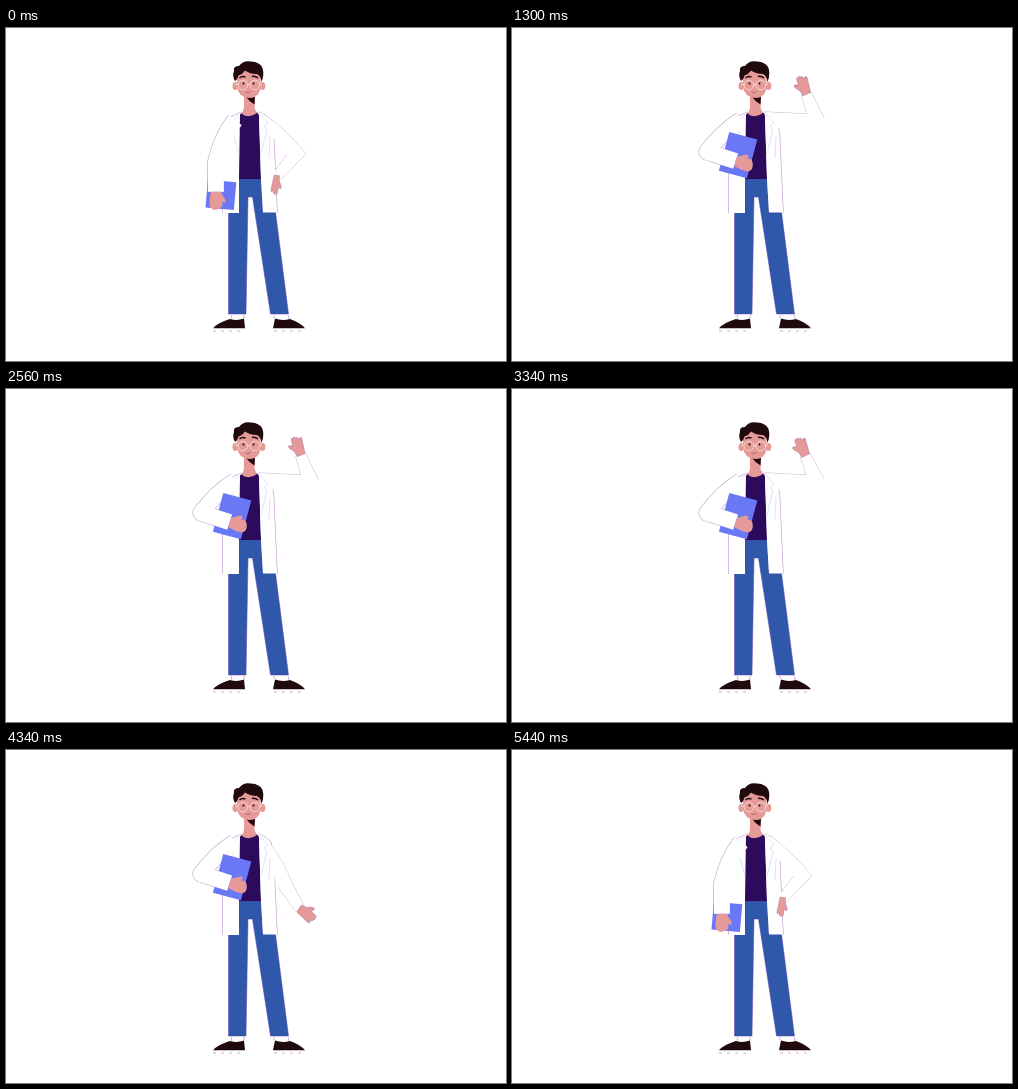
Recreate the animation shown at these times as an HTML page. Size 500x333 px, loop 6000 ms.

```html
<!DOCTYPE html>
<html lang="en">
<head>
<meta charset="utf-8">
<title>Waving doctor</title>
<style>
  html, body { margin: 0; width: 100%; height: 100%; overflow: hidden; background: #fff; }
  svg { display: block; width: 100%; height: 100%; }
  .edge { fill: none; stroke: #c39acb; stroke-width: .8; stroke-linejoin: round; }
  .fold { fill: none; stroke: #d9d9f6; stroke-width: .8; }
  .skin { fill: #e59a98; }
  .palm { stroke: #a873b0; stroke-width: .5; }
  .dark { fill: #210a0d; }
  .white { fill: #fff; }
  .sleeve { fill: none; stroke: #fff; stroke-width: 16; stroke-linejoin: round; }
</style>
</head>
<body>
<svg viewBox="0 0 500 333">
  <!-- legs and shoes -->
  <path fill="#3058aa" stroke="#5b3fae" stroke-width=".5" d="M233 151H255L257 184H269.500L282.500 286H264.500L246.500 169H242L240 286H222.500V184H233Z"/>
  <path class="edge" d="M225 287L226 291M282 287L283 291M238 287V290M268 287V290"/>
  <path class="edge" stroke-dasharray="3 5" d="M207 303H239M268 303H300"/>
  <path class="dark" d="M224 291Q231 293 238 290.500L239 300.300H207Q211 295 224 291ZM284 291Q276 293 269 290.500L267 300.300H299Q295 295 284 291Z"/>

  <!-- shirt, neck and head -->
  <path fill="#2c0a5c" d="M234 86L238 84L250 84L253 86L255 151H233Z"/>
  <path class="skin" d="M238 64L249 68L248.500 80L251 85Q243 91 236 86L238 80Z"/>
  <path class="dark" d="M239.500 68Q245 70.500 249 68.500L248.500 76.500Q243 73.500 239.500 68Z"/>
  <g class="skin">
    <ellipse cx="229.300" cy="58" rx="2.800" ry="4"/>
    <ellipse cx="256.500" cy="58" rx="2.800" ry="4"/>
    <path d="M231 42H254.500V58Q254 70 243 70Q232 69 231 58Z"/>
  </g>
  <path class="dark" d="M229 53Q226 48 228 43Q227 38 233 38Q237 32 245 33.500Q254 34 256.500 40Q258.500 47 255.500 54Q255 48 251 46Q244 46 239 42.500Q237 46 232.500 47.500Q231 52 229 53Z"/>
  <path d="M233.500 50Q236 47.500 239.500 49M246 48.500Q249 47.500 252 50" fill="none" stroke="#210a0d" stroke-width="1.400"/>
  <g fill="none" stroke="#f6dccf" stroke-width=".9">
    <circle cx="236.800" cy="57" r="4.800"/>
    <circle cx="248.800" cy="57" r="4.800"/>
    <path d="M241.600 56.500H244M229 56L232 56.500M253.600 56.500L256 56"/>
  </g>
  <g class="dark">
    <circle cx="237.500" cy="55.500" r="1"/>
    <circle cx="247.500" cy="55.500" r="1"/>
  </g>
  <path d="M239.500 64Q242 65.500 244.500 63.500" fill="none" stroke="#a0505c" stroke-width=".7"/>

  <!-- coat and waving arm -->
  <path id="armEdge" class="edge"/>
  <path id="sleeveEdge" class="edge" style="stroke-width:17.200"/>
  <path class="edge" style="stroke-width:1.300" d="M236 84Q225 88 221 93L217 105V185M252 84Q262 87 265 93L267.500 106L271 184.500"/>
  <path id="armFill" class="white"/>
  <path class="white" d="M236 84Q225 88 221 93L217 105V185H233V88ZM252 84Q262 87 265 93L267.500 106L271 184.500H257L255 151L253 88Z"/>
  <path class="fold" d="M233 86L225.500 95L229 98L226.500 102L233 126M254 86L262 95L258 98L261 102L255 126M264 108L263 130M218 106V122"/>
  <path id="hand" class="skin palm" d="M-4.500 -1L-6 8L-7 14Q-5.500 16 -4 13.500Q-3 17.500 -1.500 16Q0 18.500 1 16.500Q3 18 3.500 15L4 10L7.500 11.500Q9.500 10.500 7.500 8L4.500 4L4 -1Z"/>

  <!-- folder arm -->
  <path id="upperSleeve" class="sleeve"/>
  <rect id="folder" fill="#6b78f6"/>
  <path id="foreSleeve" class="sleeve"/>
  <path id="fist" class="skin" d="M-5 0L5 0Q6 3 9 7Q11 10 8 11L6 10Q8 15 3 17Q-3 20 -6 15Q-7 8 -5 0Z"/>
</svg>
<script>
const LOOP = 6000, WAVE = [1240, 3740], WAVES = 6, SWING = 13;
// time, upper arm angle, forearm angle, wrist bend, hand width
const KEYS = [
  [0, 41, -41, 35, .65],
  [620, 21, 59, 8, 1],
  [680, 22, 73, 2, 1],
  [920, 48, 129, 0, 1],
  [1240, 90, 205, 0, 1],
  [3740, 90, 205, 0, 1],
  [4040, 52, 125, 4, 1],
  [4340, 22, 32, 24, 1],
  [4960, 41, -41, 35, .65]
];
const el = id => document.getElementById(id);
const set = (id, attrs) => { for (const k in attrs) el(id).setAttribute(k, attrs[k]); };
const rad = a => a * Math.PI / 180;
const mix = (a, b, k) => a + (b - a) * k;
const clamp = k => Math.max(0, Math.min(1, k));
const ease = k => k * k * (3 - 2 * k);
const line = pts => 'M' + pts.join('L');
const curve = (a, b, c) => `M${a}Q${b} ${c}`;

// Angles are measured from straight down, growing towards the right.
const reach = ([x, y], a, len) => [x + len * Math.sin(rad(a)), y + len * Math.cos(rad(a))];
const side = (p, a, w) => reach(p, a + 90, w);

function slope(i, c) {
  if (!i || i === KEYS.length - 1) return 0;
  const [p, q, r] = [KEYS[i - 1], KEYS[i], KEYS[i + 1]];
  if ((q[c] - p[c]) * (r[c] - q[c]) <= 0) return 0;
  return (r[c] - p[c]) / (r[0] - p[0]);
}

function track(t, c) {
  const i = KEYS.findIndex(k => k[0] > t) - 1;
  if (i < 0) return KEYS[KEYS.length - 1][c];
  const a = KEYS[i], b = KEYS[i + 1], d = b[0] - a[0], u = (t - a[0]) / d;
  return mix(a[c], b[c], ease(u))
    + d * u * (1 - u) * ((1 - u) * slope(i, c) - u * slope(i + 1, c));
}

function wavingArm(t) {
  const up = track(t, 1);
  let fore = track(t, 2);
  if (t > WAVE[0] && t < WAVE[1]) {
    const turn = (t - WAVE[0]) / (WAVE[1] - WAVE[0]) * WAVES;
    fore -= SWING * (1 - Math.cos(turn * 2 * Math.PI)) / 2;
  }
  const shoulder = [262, 93], w = 7;
  const elbow = reach(shoulder, up, 43.5), wrist = reach(elbow, fore, 30);
  const mid = (up + fore) / 2, corner = w / Math.cos(rad((fore - up) / 2));
  const round = side(reach(shoulder, up, 12), up, w + 1);
  const outer = curve([254, 84], round, side(elbow, mid, corner)) + 'L' + side(wrist, fore, 5);
  const inner = [side(wrist, fore, -5), side(elbow, fore, -w)];
  const under = [side(elbow, up, -w), side(shoulder, up, -w)];
  set('armEdge', { d: outer + line(inner) });
  set('armFill', { d: outer + 'L' + [...inner, ...under].join('L') + 'Z' });
  set('hand', {
    transform: `translate(${wrist}) rotate(${-fore - track(t, 3)}) scale(${track(t, 4)} 1.05)`
  });
}

function folderArm(t) {
  const k = t < 3000 ? ease(clamp((t - 20) / 660)) : 1 - ease(clamp((t - 4780) / 660));
  const up = mix(-22, -46, k), fore = mix(0, 72, k);
  const shoulder = [226, 94], elbow = reach(shoulder, up, 43), wrist = reach(elbow, fore, 30);
  const upper = curve([229, 92], side(reach(shoulder, up, 18), up, -4), elbow);
  set('sleeveEdge', { d: upper + 'L' + wrist });
  set('upperSleeve', { d: upper + 'L' + reach(elbow, fore, 4) });
  set('foreSleeve', { d: line([elbow, wrist]) });
  set('fist', { transform: `translate(${wrist}) rotate(${-fore})` });

  const w = mix(28.5, 40, k), h = mix(28, 29, k);
  const x = wrist[0] + mix(5, 2.5, k), y = wrist[1] + mix(3, -6, k);
  set('folder', {
    x: -w / 2, y: -h / 2, width: w, height: h,
    transform: `translate(${x} ${y}) rotate(${mix(5, -75, k)})`
  });
}

function draw(now) {
  const t = now % LOOP;
  wavingArm(t);
  folderArm(t);
}

const start = performance.now();
function tick() {
  draw(performance.now() - start);
  requestAnimationFrame(tick);
}
tick();
</script>
</body>
</html>
```
